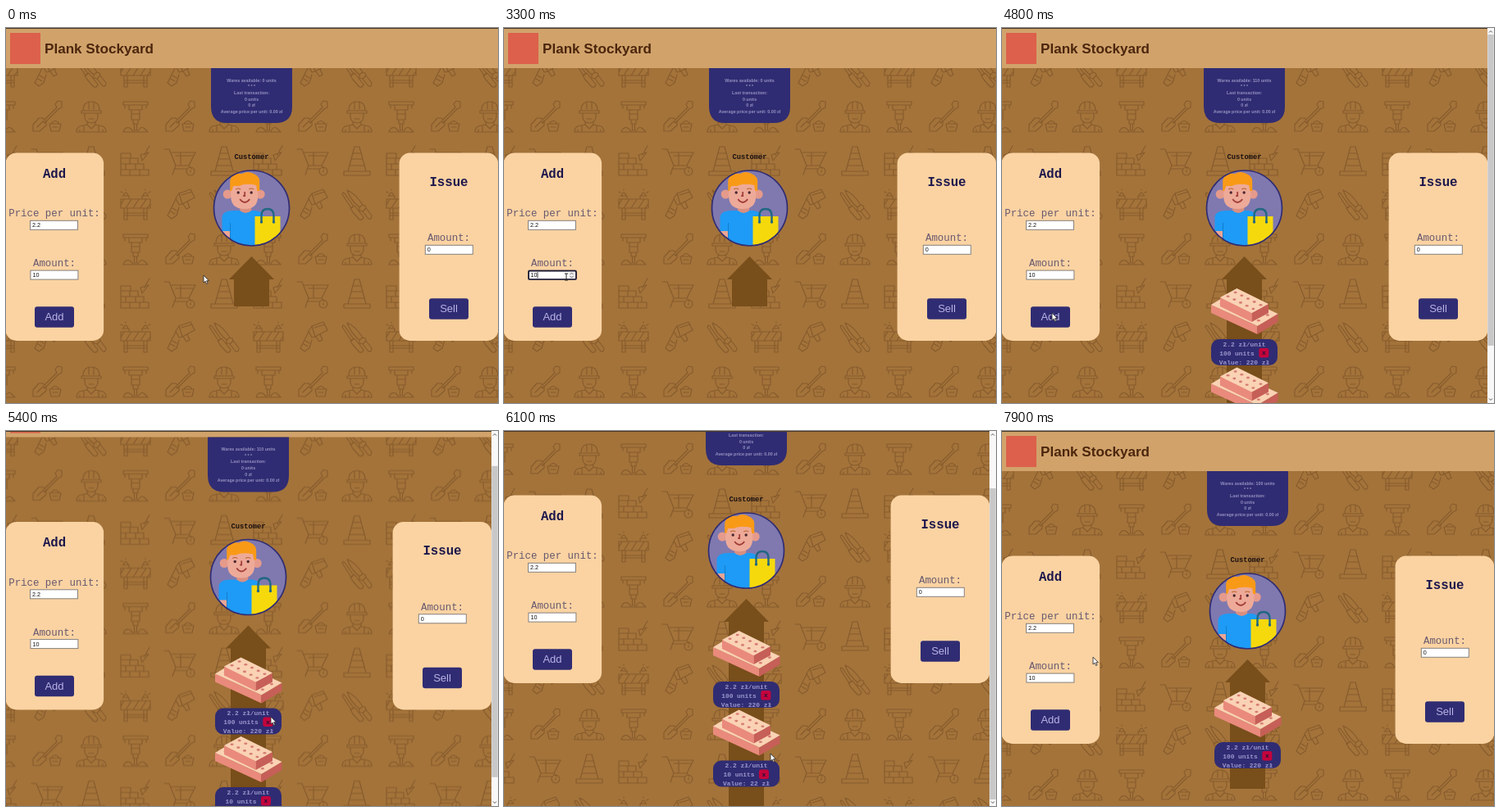
These frames come from a looping animation (600 px wide and 458 px high, 8 s). An HTML page:

```html
<!DOCTYPE html>
<html lang="en">
<head>
<meta charset="utf-8">
<title>Plank Stockyard</title>
<style>
  html, body { margin: 0; width: 100%; height: 100%; overflow: hidden; background: #a3733a; }
  svg { display: block; width: 600px; height: 458px; }
  text { font-family: "Liberation Sans", Arial, sans-serif; }
  .mid { text-anchor: middle; }
  .mono { font-family: "Liberation Mono", "Courier New", monospace; }
  .title { font-size: 17.1px; font-weight: bold; fill: #4c260d; }
  .heading { font-size: 15.7px; font-weight: bold; fill: #1d174c; }
  .label { font-size: 12.4px; fill: #685870; }
  .value { font-size: 7.2px; fill: #111; }
  .button { font-size: 13px; fill: #b9b3e6; }
  .info { font-size: 5.35px; font-weight: bold; fill: #9490c0; }
  .name { font-size: 8.8px; font-weight: bold; fill: #1b1111; }
  .tag { font-size: 7.9px; font-weight: bold; fill: #9a96cc; }
  .cross { font-size: 8px; font-weight: bold; fill: #22103a; }
  .icons { fill: none; stroke: #875b2b; stroke-width: 1.2; stroke-linejoin: round; stroke-linecap: round; }
</style>
</head>
<body>
<svg id="stage" viewBox="0 0 600 458" xmlns="http://www.w3.org/2000/svg"></svg>
<script>
const LOOP = 8000, STEP = 100, NAVY = '#302c73', SAND = '#fbd3a2';
const stage = document.getElementById('stage');

const rect = (x, y, w, h, fill, r = 0, extra = '') =>
  `<rect x="${x}" y="${y}" width="${w}" height="${h}" rx="${r}" fill="${fill}" ${extra}/>`;
const circle = (x, y, r, fill, extra = '') =>
  `<circle cx="${x}" cy="${y}" r="${r}" fill="${fill}" ${extra}/>`;
const text = (x, y, cls, str, id = '') =>
  `<text x="${x}" y="${y}" class="${cls}" ${id && `id="${id}"`}>${str}</text>`;
const path = (d, extra = '') => `<path d="${d}" ${extra}/>`;
const group = (id, body, extra = '') => `<g id="${id}" ${extra}>${body}</g>`;
const poly = (points, fill) => `<polygon points="${points.join(' ')}" fill="${fill}"/>`;

// Tool icons, each centred in a 54 px cell; three per row.
const icons = [
  // jackhammer, shovel, worker
  'M-15-18H15V-14H-15ZM-8-14V-8H8V-14M-5-8V4H5V-8M-5-3H5M-3 4V9H3V4M-1.5 9V17H1.5V9M-15 19Q-13 12-7 14L-3 18M3 18Q6 12 10 14L15 19H-15M-13-14V-10M13-14V-10',
  'M18-18L13-19L10-15L12-11L-5 6L-3 8L14-9L18-11ZM-5 2L-10 2L-17 10V18H-9L-1 11V6ZM-12 13L-6 7M3 9H17L15 18H5ZM5 9Q10 2 15 9M7 13H13',
  'M-10-7Q-10-18 0-18Q10-18 10-7M-12-7H12V-4H-12ZM-3-18V-9M3-18V-9M-8-4V1Q-7 8 0 8Q7 8 8 1V-4M-5 6V10L-14 12Q-18 14-18 19H18Q18 14 14 12L5 10V6M-9 11V19M9 11V19M-5 10L0 15L5 10M-14 19V16M14 19V16M-3 3H3',
  // brick wall, wheelbarrow, cone
  'M-18 18H16V11H-18ZM-18 11V4H10V11M-18 4V-3H3V4M-7 18V11M5 18V11M-12 11V4M0 11V4M-7 4V-3M-18-3V-9H-6V-3M6-7L16-10L8 0ZM11-7L14-13L17-18',
  'M-19-14H-13L-5 6H11L19-10H-10M-5 6L-9 17M11 6L14 10M-7 10H8M13 8A5 5 0 1 1 12.9 8M13 12V14M-5-6H16M1-10V5',
  'M-16 18V13H16V18ZM-11 13L-3-17H3L11 13M-5-9H5M-7-2H7M-9 6H9',
  // barrier, saw, screwdriver and knife
  'M-18-7H18V4H-18ZM-14-7L-18 0M-5-7L-12 4M4-7L-3 4M13-7L6 4M18-1L14 4M-14 4V18H-10V4M10 4V18H14V4M-14 10H14M-14 13H14M-16-11H-8V-7M16-11H8V-7M-15-11Q-12-19-9-11M9-11Q12-19 15-11M-18-16L-16-15M18-16L16-15M-12-19V-18M12-19V-18',
  'M-1-14L13-19L18-9L3-1ZM2-12L15-16M-1-14L-5-8L-1 0L3-1M-5-7L-9 1L-15 13L-10 17L-4 13L-1 3M-11 8L-6 11M-9 4L-4 7M4-1L8 5L12 3L9-4',
  'M-12-18Q-2-14 7 0L3 3Q-8-6-12-18M7 0L10 1L11 4L7 8L3 7L3 3M11 4L18 13Q18 18 14 17L7 8M-18-13L-17-15L-15-14L-4 2L-7 4ZM-8 4L-3 1L1 6L8 15Q7 19 3 18L-5 9Z'
];
const tile = icons.map((d, i) =>
  path(d, `transform="translate(${27 + i % 3 * 54} ${27 + Math.floor(i / 3) * 54})"`)).join('');

// An isometric block: left, front and right corners of the top face, and its height.
function block([lx, ly], [fx, fy], [rx, ry], h) {
  const bx = lx + rx - fx, by = ly + ry - fy;
  let holes = '';
  for (let i = 0; i < 5; i++) for (let j = 0; j < 2; j++) {
    const u = .1 + i * .2, v = .28 + j * .44;
    holes += `<ellipse cx="${lx + (fx - lx) * u + (bx - lx) * v}" cy="${ly + (fy - ly) * u + (by - ly) * v}" rx="2" ry="1.3" fill="#d57c72"/>`;
  }
  return poly([lx, ly, fx, fy, fx, fy + h, lx, ly + h], '#e98a7c') +
    poly([fx, fy, rx, ry, rx, ry + h, fx, fy + h], '#c65f57') +
    poly([lx, ly, fx, fy, rx, ry, bx, by], '#fad2b4') + holes;
}

// One stack of bricks with its tag, in coordinates where x = 0 is the centre line.
function stock(id, dy, amount, value) {
  const width = amount.length * 4.74, left = -9 - width / 2, cross = left + width + 6.5;
  return group(id,
    block([-40.5, 338], [16, 364], [41, 349], 10) +
    block([-29.5, 329], [9, 348], [29.5, 337], 11) +
    rect(-40.5, 380, 81, 32, NAVY, 10) +
    text(0, 388.5, 'mono tag mid', '2.2 zł/unit') +
    text(left, 399.6, 'mono tag', amount) +
    rect(cross - 1, 391, 12, 11.5, '#c3043c', 2.5) +
    text(cross + 5, 399.3, 'mono cross mid', 'x') +
    text(0, 410.6, 'mono tag mid', `Value: ${value} zł`),
    `transform="translate(0 ${dy})"`);
}

const head =
  path('M-15 214H-1V223Q-8 229-15 223Z', 'fill="#d98f80"') +
  circle(-30, 203, 5.5, '#e59a8b') + circle(10, 203, 5.5, '#e59a8b') +
  path('M-26 188H7V207Q6 221-9 221Q-25 221-26 207Z', 'fill="#eeaa98"') +
  path('M-27 199V186Q-25 176-12 178Q-6 174 2 178Q10 181 9 190V199H6L5 192Q-8 189-16 193H-23L-25 199Z', 'fill="#f99a17"') +
  circle(-17, 201, 1.7, '#4a2730') + circle(-1, 201, 1.7, '#4a2730') +
  path('M-9 200V205H-11M-15 209Q-9 217-3 209', 'fill="none" stroke="#a3403c" stroke-width="1.8"') +
  path('M-20 197Q-17 195-14 197M-4 197Q-1 195 2 197', 'fill="none" stroke="#b9662f" stroke-width="1.2"');

const bag =
  rect(4, 230, 31, 40, '#f6d90c') +
  path('M12 237V229Q12 221 19.5 221Q27 221 27 229V237', 'fill="none" stroke="#216782" stroke-width="2.4"') +
  circle(12, 237, 1.7, '#216782') + circle(27, 237, 1.7, '#216782');

const customer =
  circle(0, 220, 46, '#7f79b0') +
  group('person',
    path('M-36 270V231Q-35 223-22 223H5Q14 224 16 232V270Z', 'fill="#1d9bf6"') +
    path('M-36 248H-26V270H-36Z', 'fill="#eba594"') +
    path('M-26 238V268', 'stroke="#157ccb"') + group('head', head, 'transform="translate(.7 0)"') + bag,
    'clip-path="url(#disc)"') +
  circle(0, 220, 46, 'none', `stroke="${NAVY}" stroke-width="1.7"`);

const panel = (x, w) => rect(x, 152.6, w, 229.3, SAND, 13);
const field = (x, y, value, id = '') =>
  rect(x + .5, y + .5, 58, 11, '#fff', 0, 'stroke="#85807c"') +
  text(x + 3, y + 8.5, 'value', value, id);
const button = (x, y, label) =>
  rect(x, y, 48, 25.6, NAVY, 3) + text(x + 24, y + 17.2, 'button mid', label);

const infoLines = ['', '* * *', 'Last transaction:', '0 units', '0 zł', 'Average price per unit: 0.00 zł'];

stage.innerHTML =
  `<defs>
    <pattern id="tools" x="-31" y="-81" width="162" height="162" patternUnits="userSpaceOnUse"><g class="icons">${tile}</g></pattern>
    <clipPath id="disc"><circle cy="220" r="46"/></clipPath>
  </defs>` +
  rect(0, 0, 600, 458, '#a3733a') +
  group('page',
    rect(0, 0, 600, 540, 'url(#tools)') +
    rect(0, 0, 600, 49, '#d1a36b') + rect(5, 6, 37, 38, '#dc604b') +
    text(47, 31, 'title', 'Plank Stockyard') +
    panel(-.5, 119.6) +
    text(59, 182.5, 'mono heading mid', 'Add') +
    text(59, 230, 'mono label mid', 'Price per unit:') + field(29, 234.8, '2.2') +
    text(59, 291, 'mono label mid', 'Amount:') + field(29.4, 295.6, '10', 'amount') +
    group('focus',
      rect(30, 296.6, 58, 10.4, 'none', 1.5, 'stroke="#15132d" stroke-width="1.7"') +
      rect(78.5, 297.8, 8, 8, '#ececec') +
      path('M80.5 301L82.5 299L84.5 301M80.5 303L82.5 305L84.5 303', 'fill="none" stroke="#666" stroke-width=".9"') +
      rect(40, 298.1, .8, 7.4, '#111', 0, 'id="caret"')) +
    button(35, 340.2, 'Add') +
    group('issue',
      panel(479.6, 120.6) +
      text(540, 192.8, 'mono heading mid', 'Issue') +
      text(540, 260, 'mono label mid', 'Amount:') + field(510.8, 264.8, '0') +
      button(516, 330.2, 'Sell')) +
    group('centre',
      path('M-49.5 49H49.5V96Q49.5 116 29.5 116H-29.5Q-49.5 116-49.5 96Z', `fill="${NAVY}"`) +
      infoLines.map((s, i) => text(0, 65.7 + i * 7.6, 'info mid', s, i ? '' : 'wares')).join('') +
      text(0, 160, 'mono name mid', 'Customer') +
      customer +
      path('', 'id="arrow" fill="#784e1a"') +
      stock('stock1', 0, '100 units', 220) + stock('stock2', 96.5, '10 units', 22))) +
  rect(0, 0, 600, 1, '#4a3826') +
  group('bar',
    rect(592, 0, 8, 458, '#f8f8f8') + rect(592.3, 8, 7.4, 380, '#c8c8c8', 0, 'id="thumb"') +
    path('M594 5.5L596 3.5L598 5.5M594 452.5L596 454.5L598 452.5', 'fill="none" stroke="#555"')) +
  group('pointer', path('M0 0V9L2.1 7.2L3.6 10.5L5.1 9.8L3.6 6.7H6.4Z', 'fill="#fff" stroke="#222" stroke-width=".8"')) +
  group('beam', path('M-2-4H2M0-4V4M-2 4H2', 'fill="none" stroke="#222" stroke-width="1"'));

const el = id => document.getElementById(id);
const show = (id, on) => el(id).setAttribute('display', on ? 'inline' : 'none');
const move = (id, x, y) => el(id).setAttribute('transform', `translate(${x} ${y})`);

const cursorKeys = [
  [2000, 241, 302], [2600, 76, 304], [3400, 76, 304], [3600, 61, 348], [3800, 61, 348],
  [4000, 76, 304], [4200, 76, 304], [4400, 61, 348], [4900, 61, 348], [5300, 323, 349],
  [5700, 323, 349], [6100, 325, 394], [6500, 317, 416], [7300, 317, 416], [7800, 111, 276]
];
const scrollKeys = [[5200, 0], [5400, 41.5], [5600, 74]];

// Eased value of a keyframe list at time t.
function at(keys, t) {
  const next = keys.findIndex(k => k[0] > t);
  if (next === 0) return keys[0].slice(1);
  if (next < 0) return keys[keys.length - 1].slice(1);
  const a = keys[next - 1], b = keys[next], p = (t - a[0]) / (b[0] - a[0]);
  const e = p * p * (3 - 2 * p);
  return a.slice(1).map((v, i) => v + (b[i + 1] - v) * e);
}

const between = (t, a, b) => t >= a && t < b;

function render(t) {
  const first = t >= 3700, second = between(t, 4500, 6800);
  const scroll = second ? at(scrollKeys, t)[0] : 0;
  const [x, y] = at(cursorKeys, t);

  move('page', 0, -scroll);
  move('centre', second ? 295.5 : 299.5, 0);
  move('issue', second ? -8 : 0, 0);
  show('stock1', first);
  show('stock2', second);
  const foot = 340 + 97 * (first + second);
  el('arrow').setAttribute('d', `M0 279L27.5 307H21.5V${foot}H-21.5V307H-27.5Z`);
  el('wares').textContent = `Wares available: ${100 * first + 10 * second} units`;

  const typed = between(t, 3400, 4100) ? '100' : '10';
  el('amount').textContent = typed;
  el('caret').setAttribute('x', 32.6 + typed.length * 4);
  show('focus', between(t, 2800, 3700) || between(t, 4000, 4500));

  show('bar', second);
  el('thumb').setAttribute('y', 8 + scroll * 62 / 74);

  const overField = between(x, 30, 88) && between(y, 296, 308);
  show('beam', overField);
  show('pointer', !overField);
  move('beam', x, y);
  move('pointer', x, y);
}

const start = performance.now();
function tick(now) {
  const t = Math.max(0, now - start) % LOOP;
  render(Math.floor(t / STEP) * STEP);
  requestAnimationFrame(tick);
}
render(0);
requestAnimationFrame(tick);
</script>
</body>
</html>
```
